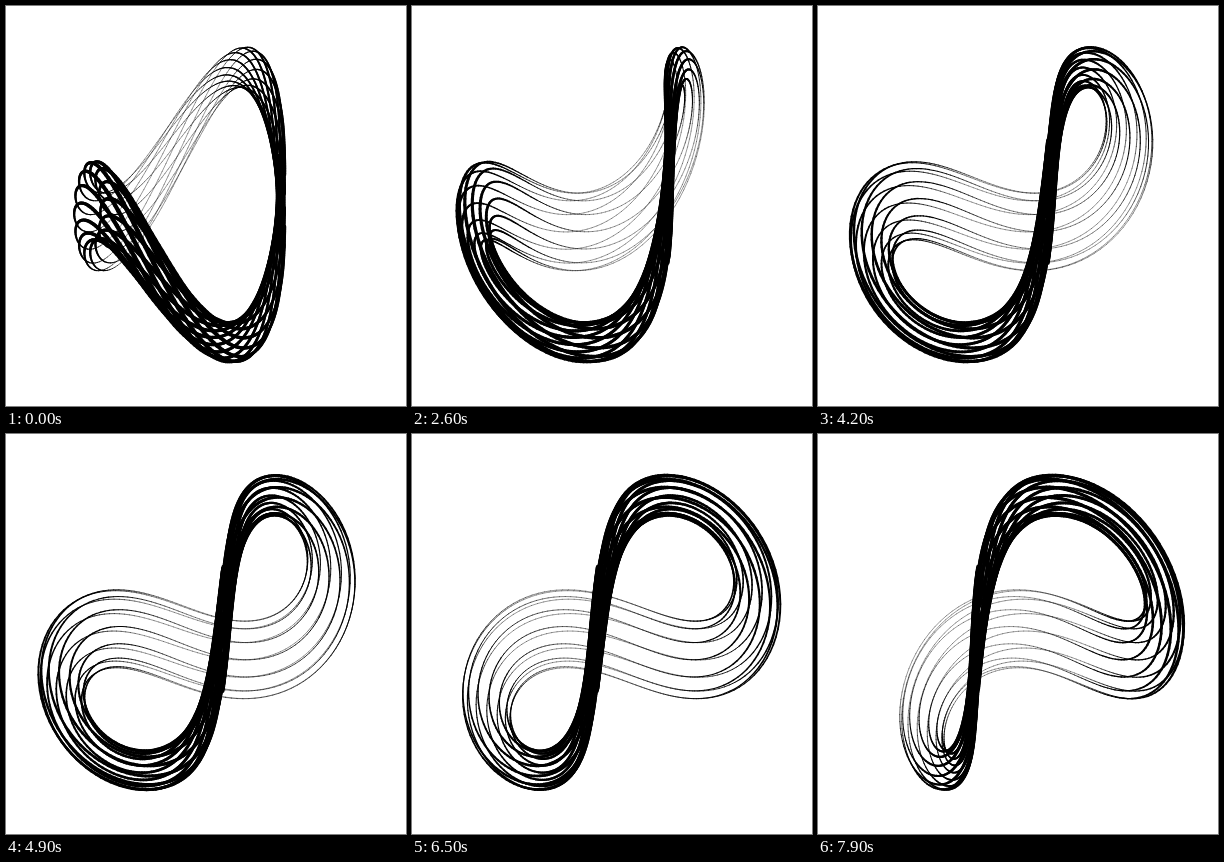
Animation, 400 px wide and 400 px high, one loop 8 s. Source, as an HTML page with a canvas:

```html
<!DOCTYPE html>
<html lang="en">
<head>
<meta charset="utf-8">
<title>Turning torus</title>
<style>
  html, body { margin: 0; width: 100%; height: 100%; overflow: hidden; background: #fff; }
  canvas { display: block; }
</style>
</head>
<body>
<canvas id="stage" width="400" height="400"></canvas>
<script>
const ctx = document.getElementById('stage').getContext('2d');
const STRANDS = 14, DT = 0.025, LOOP = 8000, TICK = 100;
const CENTER = { x: 200.5, y: 198.5 }, AXIS = 1.01, SCALE = 65.6;

// Nosé-Hoover oscillator
const flow = ([x, y, z]) => [y, y * z - x, 1 - y * y];
const add = (p, v, h) => p.map((c, i) => c + v[i] * h);

function advance(p) {
  const a = flow(p);
  const b = flow(add(p, a, DT / 2));
  const c = flow(add(p, b, DT / 2));
  const d = flow(add(p, c, DT));
  return p.map((q, i) => q + (a[i] + 2 * b[i] + 2 * c[i] + d[i]) * DT / 6);
}

// Half a turn, from the wide side of the torus to the narrow one
function halfTurn(phase) {
  let p = [2.825 + 0.2 * Math.sin(phase), 0, 0.62 * Math.cos(phase)];
  const path = [p];
  for (let t = 0; t < 5.5; t += DT) {
    p = advance(p);
    path.push(p);
    if (p[1] >= 0 || p[2] > 1.3) break;
  }
  return path;
}

// The flow is reversible, so the other half is a mirror image
const halves = Array.from({ length: STRANDS }, (_, i) => halfTurn((i + 0.5) * 2 * Math.PI / STRANDS));
const paths = halves.concat(halves.map(path => path.map(([x, y, z]) => [x, -y, -z])));
const peak = Math.max(...paths.flat().map(p => p[2]));
const LIFT = 157 / peak;

function draw(time) {
  const angle = (4 + time * 0.015) * Math.PI / 180;
  const cos = Math.cos(angle), sin = Math.sin(angle);
  const project = ([x, y, z]) => {
    const a = (AXIS - x) * SCALE, b = y * SCALE;
    return {
      x: CENTER.x + a * cos + b * sin,
      y: CENTER.y - z * LIFT + 5.5 * (x - 0.5),
      depth: a * sin - b * cos
    };
  };

  ctx.fillStyle = '#fff';
  ctx.fillRect(0, 0, 400, 400);
  ctx.strokeStyle = '#000';
  ctx.lineCap = 'round';
  for (const path of paths) {
    let from = project(path[0]);
    for (let i = 1; i < path.length; i++) {
      const to = project(path[i]);
      ctx.lineWidth = Math.max(0.4, 2.2 + 0.0155 * to.depth);
      ctx.beginPath();
      ctx.moveTo(from.x, from.y);
      ctx.lineTo(to.x, to.y);
      ctx.stroke();
      from = to;
    }
  }
}

const start = performance.now();
let shown = -1;
function play() {
  const elapsed = Math.max(0, performance.now() - start) % LOOP;
  const time = Math.floor(elapsed / TICK) * TICK;
  if (time !== shown) draw(shown = time);
  requestAnimationFrame(play);
}
play();
</script>
</body>
</html>
```
